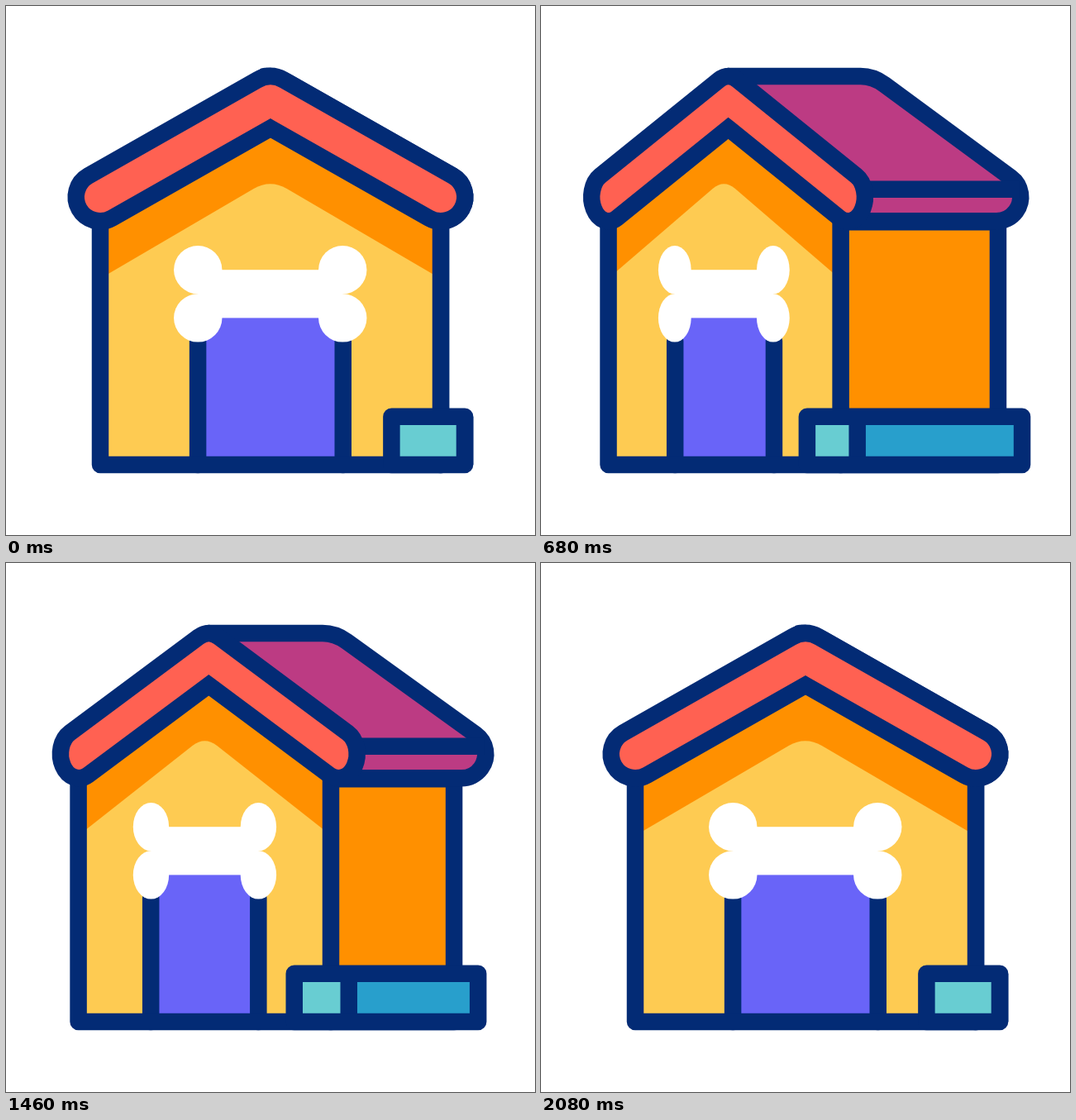
Write an HTML page with a canvas that moves like this. It is 640 px wide and 640 px high and loops after 2.4 s.

```html
<!DOCTYPE html>
<html lang="en">
<head>
<meta charset="utf-8">
<title>Dog house</title>
<style>
  html, body { margin: 0; width: 100%; height: 100%; overflow: hidden; background: #fff; }
  canvas { display: block; width: 640px; height: 640px; }
</style>
</head>
<body>
<canvas id="stage"></canvas>
<script>
const LOOP = 2400;
const NAVY = '#032b75', RED = '#ff6152', ORANGE = '#ff9000', YELLOW = '#fecb52',
      VIOLET = '#6964f8', TEAL = '#68cdd2', BLUE = '#289fcc', PLUM = '#bc3b83';

const canvas = document.getElementById('stage');
const ratio = window.devicePixelRatio || 1;
canvas.width = canvas.height = 640 * ratio;
const ctx = canvas.getContext('2d');

// Smooth track through [time, value] steps, without overshoot.
function track(times, values) {
  const n = times.length;
  const rate = i => (values[i + 1] - values[i]) / (times[i + 1] - times[i]);
  const slope = values.map((_, i) => {
    if (i === 0 || i === n - 1) return 0;
    const a = rate(i - 1), b = rate(i);
    return a * b > 0 ? 2 * a * b / (a + b) : 0;
  });
  return t => {
    if (t >= times[n - 1]) return values[n - 1];
    let i = 0;
    while (t >= times[i + 1]) i++;
    const h = times[i + 1] - times[i], u = (t - times[i]) / h, v = 1 - u;
    return values[i] * (1 + 2 * u) * v * v + slope[i] * h * u * v * v
         + values[i + 1] * u * u * (3 - 2 * u) - slope[i + 1] * h * u * u * v;
  };
}

const FRONT = [0, 220, 460, 660, 940, 1280, 1640, 2080];
const SIDE = [0, 220, 460, 660, 940, 1280, 1640, 1900, 2080];
const wallTurn = track(FRONT, [0, 40, 104, 131, 123, 111.5, 99.5, 0]);
const roofTurn = track(FRONT, [0, 43, 111.5, 140, 131, 118, 103, 0]);
const boneTurn = track(FRONT, [0, 27.5, 80, 98.5, 92.25, 83.75, 72.75, 0]);
const sideEdge = track(SIDE, [526, 509.5, 536.5, 553, 549.5, 544.5, 538.5, 512, 526]);
const roofEnd = track(SIDE, [555.25, 521.9, 563.8, 580.25, 580.25, 580.25, 580.25, 526, 555.25]);
const roofCorner = track(SIDE, [328, 311.7, 377, 402, 400.7, 399, 397.6, 313, 328]);

const TIP_Y = 231, TIP_R = 29.3, FLOOR = 555, PITCH = 29.6 * Math.PI / 180;

function base() { ctx.setTransform(ratio, 0, 0, ratio, 0, 0); }

// Squeezes x around cx0 and moves that point to cx; strokes stay even.
function squeeze(cx0, cx, s) { ctx.transform(s, 0, 0, 1, cx - cx0 * s, 0); }

function fill(color) { ctx.fillStyle = color; ctx.fill(); }

function box(x1, y1, x2, y2, color) {
  ctx.fillStyle = color;
  ctx.fillRect(x1, y1, x2 - x1, y2 - y1);
}

function poly(...pts) {
  ctx.beginPath();
  for (let i = 0; i < pts.length; i += 2) ctx.lineTo(pts[i], pts[i + 1]);
}

function line(...pts) { poly(...pts); ctx.stroke(); }

function drawSideRoof(t, apex, frontTip) {
  const end = roofEnd(t), corner = roofCorner(t);
  const cx = end - TIP_R, dx = corner - cx, dy = 85 - TIP_Y;
  const a = Math.atan2(dy, dx) + Math.acos(TIP_R / Math.hypot(dx, dy));
  const slope = -Math.cos(a) / Math.sin(a);
  ctx.beginPath();
  ctx.moveTo(apex, 85);
  ctx.lineTo(corner - 15.5, 85);
  ctx.quadraticCurveTo(corner, 85, corner + 13.5, 85 + 13.5 * slope);
  ctx.arc(cx, TIP_Y, TIP_R, a, Math.PI / 2);
  ctx.lineTo(frontTip, 260.3);
  fill(PLUM);
  ctx.stroke();
  ctx.lineCap = 'butt';
  line(frontTip, 221.7, end - 2, 221.7);
}

function drawFrontRoof(apex, s) {
  const half = Math.PI / 2;
  squeeze(320, apex, s);
  ctx.beginPath();
  ctx.moveTo(320, 147.8);
  ctx.arc(526, TIP_Y, TIP_R, half + PITCH, PITCH - half, true);
  ctx.lineTo(336, 89.5);
  ctx.quadraticCurveTo(320, 80.4, 304, 89.5);
  ctx.arc(114, TIP_Y, TIP_R, -half - PITCH, half - PITCH, true);
  ctx.closePath();
  base();
  fill(RED);
  ctx.lineJoin = 'miter';
  ctx.stroke();
  ctx.lineJoin = 'round';
}

function drawBone() {
  for (const x of [232.25, 407.25])
    for (const y of [319.2, 377.4]) {
      ctx.beginPath();
      ctx.arc(x, y, 29.2, 0, 2 * Math.PI);
      fill('#fff');
    }
  box(232.25, 319.2, 407.25, 377.4, '#fff');
}

function draw(t) {
  const w = wallTurn(t), d = roofTurn(t), b = boneTurn(t);
  const left = 114 - 0.248 * w, right = 526 - 1.248 * w, side = sideEdge(t);
  const apex = 320 - 0.668 * d, roofScale = 1 - d / 470.5;
  const boneX = 319.75 - b, boneScale = 1 - b * 0.003247;

  base();
  box(0, 0, 640, 640, '#fff');
  ctx.strokeStyle = NAVY;
  ctx.lineWidth = 20.5;
  ctx.lineJoin = ctx.lineCap = 'round';

  // Side
  box(right, 261.2, side, FLOOR, ORANGE);
  line(right, 261.2, side, 261.2, side, FLOOR, right, FLOOR);
  drawSideRoof(t, apex, apex + 206 * roofScale);

  // Front wall
  poly(left, FLOOR, left, TIP_Y, apex, 114, right, TIP_Y, right, FLOOR);
  fill(ORANGE);
  ctx.save();
  ctx.beginPath();
  ctx.rect(left, 190, right - left, FLOOR - 190);
  ctx.clip();
  squeeze(319.75, boneX, boneScale);
  ctx.beginPath();
  ctx.moveTo(60, 361.3);
  ctx.lineTo(299.75, 221);
  ctx.quadraticCurveTo(319.75, 209.3, 339.75, 221);
  ctx.lineTo(579.5, 361.3);
  ctx.lineTo(579.5, FLOOR);
  ctx.lineTo(60, FLOOR);
  fill(YELLOW);
  ctx.restore();

  // Door and bone
  const doorL = 232.1 - 0.534 * w, doorR = 407.75 - 0.961 * w;
  box(doorL, 362, doorR, FLOOR, VIOLET);
  ctx.lineCap = 'round';
  line(doorL, 405, doorL, FLOOR);
  line(doorR, 405, doorR, FLOOR);
  ctx.lineCap = 'butt';
  line(left, 235, left, FLOOR, right, FLOOR, right, 235);
  squeeze(319.75, boneX, boneScale);
  drawBone();
  base();

  drawFrontRoof(apex, roofScale);

  // Bowl
  const bowlL = 466.4 - 1.104 * w, split = 555.1 - 1.317 * w, bowlR = side + 29.1;
  box(bowlL, 496.75, split, FLOOR, TEAL);
  box(split, 496.75, bowlR, FLOOR, BLUE);
  line(split, 496.75, split, FLOOR);
  poly(bowlL, 496.75, bowlR, 496.75, bowlR, FLOOR, bowlL, FLOOR);
  ctx.closePath();
  ctx.stroke();
}

const start = performance.now();
function tick() {
  draw((performance.now() - start) % LOOP);
  requestAnimationFrame(tick);
}
tick();
</script>
</body>
</html>
```
